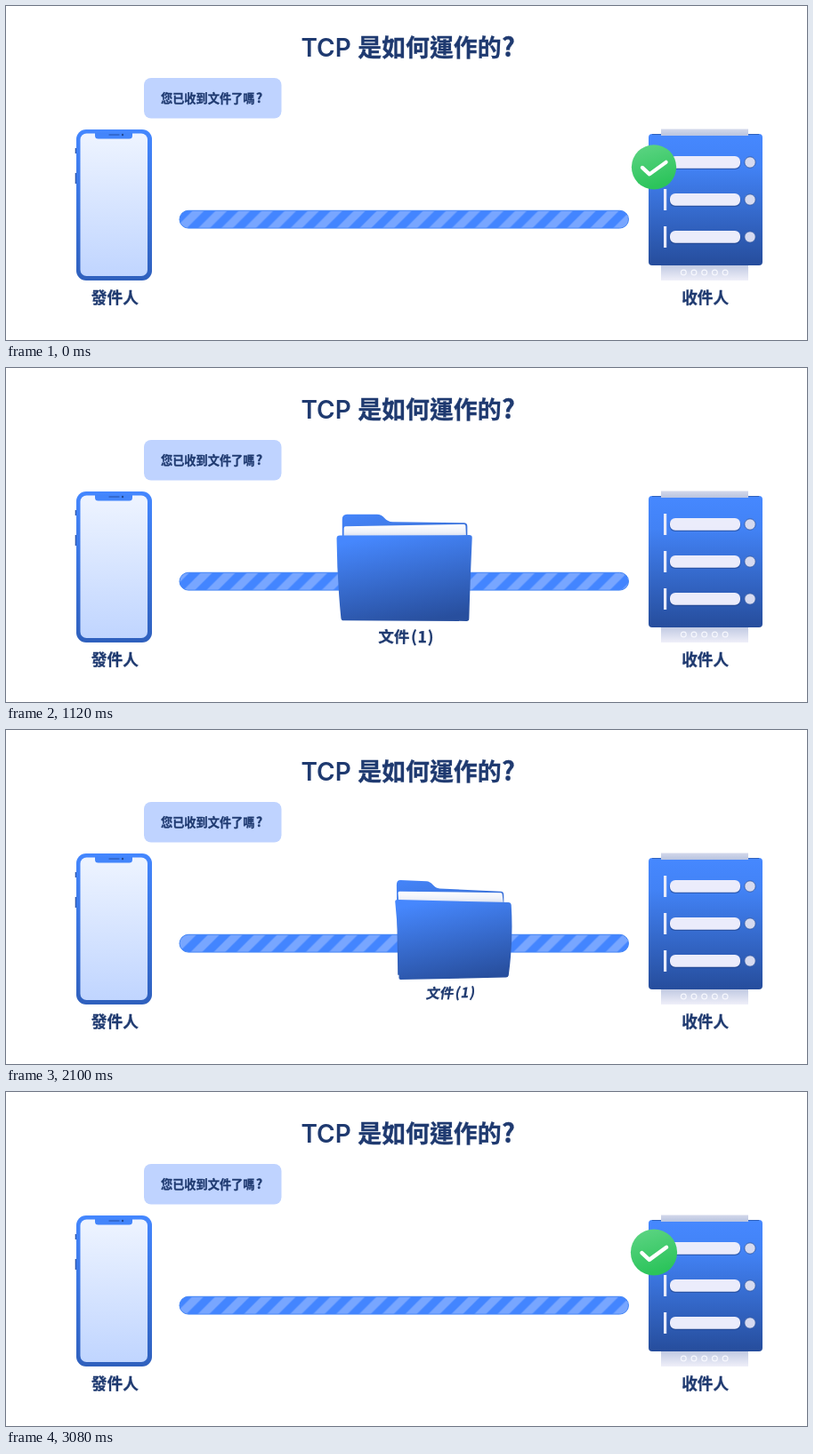
These frames come from a looping animation (900 px wide and 376 px high, 3.15 s). An HTML page:

```html
<!DOCTYPE html>
<html lang="zh-Hant">
<head>
<meta charset="utf-8">
<title>TCP 是如何運作的?</title>
<style>
  html, body { margin: 0; width: 100%; height: 100%; overflow: hidden; background: #fff; }
  svg { display: block; width: 900px; height: 376px; }
  text {
    font-family: "Noto Sans CJK TC", "Noto Sans CJK", "Noto Sans CJK JP", sans-serif; font-weight: 700;
    fill: #1f3a70; stroke: #1f3a70; stroke-width: .3px;
  }
  .latin { font-family: Inter, sans-serif; font-weight: 600; stroke: none; }
</style>
</head>
<body>
<svg viewBox="0 0 900 376" xmlns="http://www.w3.org/2000/svg">
  <defs>
    <linearGradient id="phoneBody" x2="0" y2="1"><stop stop-color="#4487ff"/><stop offset="1" stop-color="#2f60bd"/></linearGradient>
    <linearGradient id="screen" x2="0" y2="1"><stop stop-color="#eef4ff"/><stop offset="1" stop-color="#c0d5ff"/></linearGradient>
    <linearGradient id="rack" x2="0" y2="1"><stop stop-color="#4688ff"/><stop offset=".25" stop-color="#4282f5"/><stop offset="1" stop-color="#264d9c"/></linearGradient>
    <linearGradient id="lid" x2="0" y2="1"><stop stop-color="#d3d8ea"/><stop offset="1" stop-color="#b9c4e0"/></linearGradient>
    <linearGradient id="foot" x2="0" y2="1"><stop stop-color="#bcc6e0"/><stop offset="1" stop-color="#efeff9"/></linearGradient>
    <linearGradient id="front" x1=".35" y1="0" x2=".65" y2="1"><stop stop-color="#4687fd"/><stop offset="1" stop-color="#284f9e"/></linearGradient>
    <linearGradient id="back" x2=".3" y2="1"><stop stop-color="#4585fa"/><stop offset="1" stop-color="#2a54a8"/></linearGradient>
    <linearGradient id="paper" x2="0" y2="1"><stop stop-color="#fff"/><stop offset=".5" stop-color="#eef1f9"/><stop offset="1" stop-color="#c3cfe8"/></linearGradient>
    <linearGradient id="green" x2=".3" y2="1"><stop stop-color="#5fd585"/><stop offset="1" stop-color="#2cc45b"/></linearGradient>
    <pattern id="stripes" width="25.9" height="20" patternUnits="userSpaceOnUse">
      <rect width="25.9" height="20" fill="#78a6ff"/>
      <path d="M0 20L20 0H32.95L12.95 20ZM-25.9 20L-5.9 0H7.05L-12.95 20Z" fill="#4385ff"/>
    </pattern>
  </defs>

  <text class="latin" x="331.5" y="56.5" font-size="28">TCP</text>
  <text x="395.3" y="56.5" font-size="26.9">是如何運作的</text>
  <text x="557" y="56.7" font-size="29">?</text>

  <rect x="155" y="81" width="154.5" height="45.5" rx="8" fill="#bfd3ff"/>
  <text x="174" y="108.9" font-size="13.2">您已收到文件了嗎</text>
  <text x="280.8" y="108.9" font-size="14.5">?</text>

  <g id="phone">
    <path d="M78.5 160v6M78.5 188v12" stroke="#2c57ad" stroke-width="1.6"/>
    <rect x="79" y="139" width="85" height="170" rx="11" fill="url(#phoneBody)"/>
    <rect x="83.5" y="143.5" width="75.5" height="160.5" rx="7" fill="url(#screen)"/>
    <path d="M100 143H142V146Q142 149.5 138.5 149.5H103.5Q100 149.5 100 146Z" fill="#4385fb"/>
    <path d="M116 145H127" stroke="#2f62c4" stroke-width="1.3" stroke-linecap="round"/>
    <circle cx="131" cy="145" r="1.2" fill="#234a94"/>
  </g>
  <text x="122.3" y="334.9" font-size="17.7" text-anchor="middle">發件人</text>

  <g id="server">
    <rect x="736" y="290" width="98" height="19" fill="url(#foot)"/>
    <rect x="722" y="144" width="128" height="148" rx="4" fill="url(#rack)"/>
    <path d="M726 144.5H846" stroke="#2f62bd"/>
    <rect x="736" y="138.5" width="98" height="7.5" fill="url(#lid)"/>
  </g>
  <text x="785.7" y="334.9" font-size="17.7" text-anchor="middle">收件人</text>

  <rect id="bar" x="195" y="230.3" width="504.5" height="19.8" rx="9.9" fill="url(#stripes)" stroke="#4385f5" stroke-width="1"/>

  <g id="folder">
    <path id="backShape" fill="url(#back)"/>
    <path id="paperShape" fill="url(#paper)"/>
    <path id="frontShape" fill="url(#front)"/>
    <g id="caption" font-size="18">
      <text x="-32.5" y="6.7">文件</text>
      <text x="5.3" y="6.2" letter-spacing=".9">(1)</text>
    </g>
  </g>

  <g id="check">
    <circle r="25" fill="url(#green)"/>
    <path d="M-13 .5L-5 8L13.5 -5.5" fill="none" stroke="#fff" stroke-width="4.2" stroke-linecap="round" stroke-linejoin="round"/>
  </g>
</svg>
<script>
const LOOP = 3150, STEP = 70, STRIPE = 25.9;
const $ = id => document.getElementById(id);
const clamp = v => Math.max(0, Math.min(1, v));
const ramp = (t, a, b) => clamp((t - a) / (b - a));
const sine = v => (1 - Math.cos(Math.PI * v)) / 2;

function add(parent, tag, attrs) {
  const el = document.createElementNS("http://www.w3.org/2000/svg", tag);
  for (const k in attrs) el.setAttribute(k, attrs[k]);
  parent.appendChild(el);
}

const server = $("server");
for (let i = 0; i < 3; i++) {
  const y = 176 + i * 42;
  add(server, "rect", { x: 739, y: y - 12, width: 3.2, height: 24, fill: "#e9ebfa" });
  add(server, "rect", { x: 745.5, y: y - 6, width: 80, height: 14, rx: 6, fill: "#1f4184", opacity: .55 });
  add(server, "rect", { x: 746, y: y - 7, width: 79, height: 13.7, rx: 6, fill: "#ebecfb" });
  add(server, "circle", { cx: 836, cy: y, r: 6.2, fill: "#d6daf0", stroke: "#2b549f", "stroke-width": .8 });
}
for (let i = 0; i < 5; i++)
  add(server, "circle", { cx: 761.3 + i * 11.7, cy: 300, r: 2.9, fill: "none", stroke: "#f6f7fd", "stroke-width": 1.2 });

// Folder outlines at full size, centred on x = 458.5
const shapes = {
  backShape: "M386 280L385.5 168Q385.5 162 391 162L426 162.3Q431 162.5 434.5 166.5Q438.5 171 444 171.3L527 172.8Q531 173 531 177L531.5 280Z",
  paperShape: "M387.5 178Q387.5 176 389.5 176L527 174.5Q529 174.5 529 176.5L530 192L387.5 192Z",
  frontShape: "M380 190Q379.8 186.5 383.5 186.5L534 187Q537.7 187 537.5 190.5Q536.5 236.5 534 283Q533.8 285.8 531 285.8L388 286Q385.2 286 385 283Q381.5 236.5 380 190Z"
};

function drawFolder(t) {
  const mid = 1420, side = Math.sign(t - mid);
  const u = Math.abs(t - mid) / 1120, far = u ** 1.75;
  const tilt = Math.min(1, far * 3);
  const cx = 458 + side * 104.8 * far;
  const w = 1 - (side < 0 ? .34 * far : .365 * u ** 1.5);
  const h = 1 - .285 * far;
  const top = 161.7 + 20.5 * far;
  const bend = side * 2 * Math.sin(Math.PI * clamp(far));
  const turn = -side * .03 * tilt;

  const warp = (x, y, shift) => {
    const dx = x - 458.5, v = (y - 236.5) / 50;
    const px = cx + shift + dx * w + 2 * bend * Math.max(0, 1 - v * v);
    const py = top + (y - 161.5) * h;
    const axis = top + 75 * h;
    return [px, axis + (py - axis) * (1 + turn * dx / 79)].map(n => n.toFixed(2)).join(" ");
  };
  for (const id in shapes) {
    const shift = id === "frontShape" ? 0 : -side * 2.5 * tilt;
    $(id).setAttribute("d", shapes[id].replace(/([\d.]+) ([\d.]+)/g, (_, x, y) => warp(+x, +y, shift)));
  }

  const lean = side > 0 ? -10 * tilt : 0;
  const spin = side < 0 ? 3 * Math.sin(Math.PI * clamp(far)) : -tilt;
  $("caption").setAttribute("transform",
    `translate(${cx + (side < 0 ? 2.5 : 1.5 - 3 * tilt)} ${304.8 - 21 * far}) rotate(${spin}) skewX(${lean}) scale(${1 - (side < 0 ? .28 : .34) * far})`);
  $("folder").setAttribute("opacity", ramp(t, 70, 420) * (1 - ramp(t, 2310, 2700)));
}

function drawCheck(t) {
  const r = 30 * sine(ramp(t, 2340, 2800)) - 5.2 * sine(ramp(t, 2800, 3220));
  $("check").setAttribute("transform", `translate(728 ${204 - .9 * r}) scale(${r / 25})`);
  $("check").setAttribute("visibility", r > .5 ? "visible" : "hidden");
}

function frame(now) {
  const t = Math.floor((now % LOOP) / STEP) * STEP;
  const local = t || LOOP; // the first step holds the end pose
  $("stripes").setAttribute("patternTransform", `translate(${202.8 + STRIPE * t / LOOP} 230.3)`);
  drawFolder(local);
  drawCheck(local);
}

let start;
function tick(now) {
  start ??= now;
  frame(now - start);
  requestAnimationFrame(tick);
}
frame(0);
requestAnimationFrame(tick);
</script>
</body>
</html>
```
